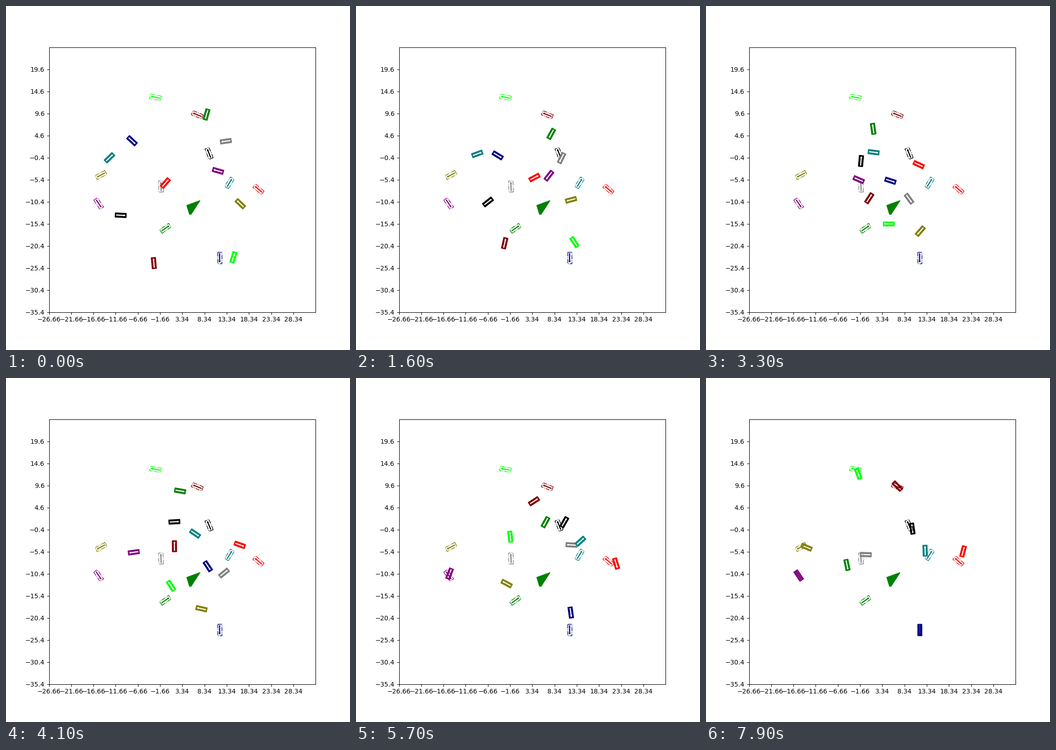
Recreate the animation shown at these times as a matplotlib script. Size 748 by 748 pixels, loop 8 s.

```python
import numpy as np
import matplotlib.pyplot as plt
from matplotlib.animation import FuncAnimation
from matplotlib.patches import Polygon

SIZE = 748
INCHES = 7.5
X0, Y0, SPAN = -26.66, -35.4, 60
LEFT, TOP = 0.125 * SIZE, 0.12 * SIZE
SX, SY = 0.775 * SIZE / SPAN, 0.77 * SIZE / SPAN

CRUISE = 6.6   # pixels per step
BRAKE = 4      # steps left to the goal at which a car starts to slow
STEPS = (0, 32, 56, 78)


def box(x0, x1, half):
    return [(x0, -half), (x1, -half), (x1, half), (x0, half)]


BODY = np.array(box(-12.1, 12.1, 4.8))
SHAFT = box(-10, 6.5, 1.2)
ARROW = np.array(SHAFT[:2] + [(6.5, -2.5), (10.5, 0), (6.5, 2.5)] + SHAFT[2:])

fig, ax = plt.subplots(figsize=(INCHES, INCHES), dpi=SIZE / INCHES + 1e-9)
ax.set_xlim(X0, X0 + SPAN)
ax.set_ylim(Y0, Y0 + SPAN)
ax.set_xticks(X0 + 5 * np.arange(12))
ax.set_yticks(Y0 + 5 * np.arange(12))


def to_data(points):
    p = np.asarray(points, float)
    return np.column_stack((X0 + (p[:, 0] - LEFT) / SX,
                            Y0 + SPAN - (p[:, 1] - TOP) / SY))


def heading_vec(deg):
    a = np.radians(deg)
    return np.array([np.cos(a), -np.sin(a)])


def outline(shape, x, y, deg):
    fwd = heading_vec(deg)
    side = np.array([fwd[1], -fwd[0]])
    return to_data((x, y) + shape[:, :1] * fwd + shape[:, 1:] * side)


class Car:
    """Drives through a few poses (x, y, heading) and brakes near its goal."""

    def __init__(self, color, goal, *poses, steps=STEPS):
        self.steps = steps
        if len(poses) < len(steps):
            poses += (goal,)
        self.poses = np.array(poses, float)
        gap = np.hypot(*(self.poses[:, :2] - goal[:2]).T)
        self.speeds = np.minimum(CRUISE, gap / BRAKE)
        self.speeds[0] = 0
        self.body = Polygon(outline(BODY, *poses[0]), fc=color, ec=color, lw=1)
        self.arrow = Polygon(outline(ARROW, *poses[0]), fc="white", lw=0)
        target = Polygon(outline(BODY, *goal), fill=False, ec=color, lw=1,
                         ls="-.")
        pointer = Polygon(outline(ARROW, *goal), fc=color, lw=0)
        for patch in (self.body, self.arrow, target, pointer):
            ax.add_patch(patch)

    def pose(self, step):
        k = min(np.searchsorted(self.steps, step, side="right"),
                len(self.steps) - 1) - 1
        span = self.steps[k + 1] - self.steps[k]
        u = (step - self.steps[k]) / span
        a, b = self.poses[k], self.poses[k + 1]
        va, vb = self.speeds[k], self.speeds[k + 1]
        ma = heading_vec(a[2]) * va * span
        mb = heading_vec(b[2]) * vb * span
        d = b[:2] - a[:2]
        x, y = (a[:2] + d * u * u * (3 - 2 * u)
                + ma * u * (1 - u) ** 2 - mb * u * u * (1 - u))
        if min(va, vb) > 3:   # moving well: face along the path
            vx, vy = (6 * d * u * (1 - u) + ma * (1 - u) * (1 - 3 * u)
                      + mb * u * (3 * u - 2))
            return x, y, np.degrees(np.arctan2(-vy, vx))
        return x, y, a[2] + (b[2] - a[2]) * u

    def move(self, step):
        pose = self.pose(step)
        self.body.set_xy(outline(BODY, *pose))
        self.arrow.set_xy(outline(ARROW, *pose))


ax.add_patch(Polygon(to_data([(393, 433.5), (422, 423), (402.5, 453),
                              (399, 453)]), fc="green", ec="green", lw=1))

cars = [
    Car("black", (441.5, 320.5, 112), (249.5, 455, -3), (337, 337, 85),
        (453, 313.5, 60), (448.5, 327.5, 98)),
    Car("gray", (337, 392.5, 92), (478, 294, 188), (441.5, 419, 306),
        (468.5, 363, 537), (347.5, 384, 538)),
    Car("maroon", (416, 236.5, 158), (321.5, 559, 95), (355, 418, 57),
        (387, 268, 33), (416, 235, 135)),
    Car("red", (549, 398.5, 139), (346.5, 385, 49), (388, 373, 28),
        (462.5, 345, -25), (565.5, 403.5, -73), (538, 427, 141),
        (559, 377, 75), steps=(0, 15, 32, 56, 65, 78)),
    Car("purple", (201.5, 429.5, 304), (461, 358.5, 164), (419.5, 369, 232),
        (332, 377.5, 157), (203.5, 425.5, 249), steps=(0, 15, 32, 56, 78)),
    Car("green", (346.5, 483.5, 35), (436, 236, 254), (424.5, 278, 241),
        (363.5, 267, 98), (412, 313.5, 241), (306.5, 406.5, 282),
        steps=(0, 15, 32, 56, 78)),
    Car("lime", (325, 198.5, 169), (494.5, 546.5, 73), (397, 473.5, 180),
        (335.5, 345, 96), (331, 208, 110)),
    Car("olive", (206.5, 367.5, 208), (509.5, 430, 136), (467.5, 421.5, 195),
        (466, 489.5, 229), (327.5, 447, 152), (218.5, 368, 157),
        steps=(0, 15, 32, 56, 78)),
    Car("navy", (464.5, 547.5, -90), (274, 293, -43), (401, 380, -18),
        (467, 510, -82)),
    Car("teal", (486, 384.5, 58), (225, 330, 44), (364.5, 318, -7),
        (488, 355, 42), (522, 369.5, -94), (476.5, 375.5, 92),
        steps=(0, 32, 56, 65, 78)),
]


def draw(i):
    # the opening pose is held for two ticks
    for car in cars:
        car.move(max(i - 1, 0))
    return []


anim = FuncAnimation(fig, draw, frames=80, interval=100, repeat=True,
                     init_func=lambda: draw(0))
plt.show()
```
